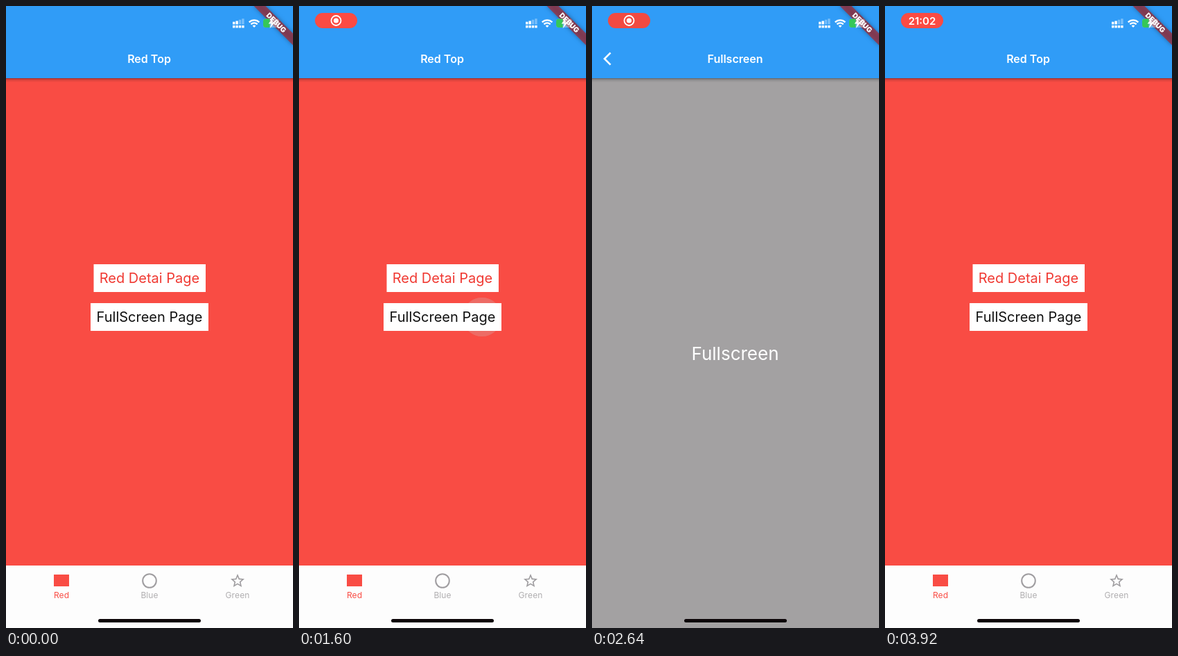
An HTML page for the animation above (4000 ms loop, 414 by 896 pixels).

```html
<!DOCTYPE html>
<html lang="en">
<head>
<meta charset="utf-8">
<title>Tab navigation</title>
<style>
  html, body { margin: 0; width: 100%; height: 100%; overflow: hidden; background: #f94c44; }
  svg { display: block; }
  text { font-family: Inter, Roboto, sans-serif; text-anchor: middle; }
  .title { font-size: 16px; font-weight: 600; fill: #fff; }
  .button { font-size: 20px; }
  .label { font-size: 12px; letter-spacing: .1px; fill: #b0aeb0; }
  .time { font-size: 15px; font-weight: 600; fill: #fff; }
  .debug { font-size: 10.2px; font-weight: 900; fill: #fff; }
  .bar { fill: #309cf7; }
  .banner { filter: drop-shadow(0 0 3px rgba(0, 0, 0, .5)); }

  .home, .scrim, .page, .pill, .pill rect, .rec, .time, .splash {
    animation: 4s linear infinite;
  }
  .home { animation-name: parallax; }
  .scrim { animation-name: dim; }
  .page { animation-name: slide; }
  .pill { animation-name: appear; }
  .pill rect { animation-name: pulse; }
  .rec { animation-name: rec; }
  .time { animation-name: time; }
  .splash { fill: #c8c8c8; transform-box: fill-box; transform-origin: center; }
  .tap { animation-name: tap; }
  .back { animation-name: back; }

  @keyframes slide {
    0% { transform: translateX(434px); }
    41.24% { transform: translateX(434px); }
    41.25% { transform: translateX(414px); animation-timing-function: cubic-bezier(.35, .91, .33, .97); }
    51.65% { transform: none; }
    79.15% { transform: none; animation-timing-function: cubic-bezier(.35, .91, .33, .97); }
    89.55% { transform: translateX(414px); }
    89.56%, 100% { transform: translateX(434px); }
  }
  @keyframes parallax {
    0% { transform: none; }
    41.25% { transform: none; animation-timing-function: cubic-bezier(.35, .91, .33, .97); }
    51.65% { transform: translateX(-138px); }
    79.15% { transform: translateX(-138px); animation-timing-function: cubic-bezier(.35, .91, .33, .97); }
    89.55%, 100% { transform: none; }
  }
  @keyframes dim {
    0% { opacity: 0; }
    41.25% { opacity: 0; animation-timing-function: ease; }
    51.65% { opacity: .094; }
    79.15% { opacity: .094; animation-timing-function: cubic-bezier(.75, 0, .75, .9); }
    89.55%, 100% { opacity: 0; }
  }
  @keyframes appear {
    0%, 1% { opacity: 0; }
    9%, 100% { opacity: 1; }
  }
  @keyframes pulse {
    0% { fill: #fb4b43; animation-timing-function: ease-in-out; }
    17% { fill: #e5483f; animation-timing-function: ease-in-out; }
    38%, 56% { fill: #fb4b43; animation-timing-function: ease-in-out; }
    80%, 86% { fill: #e3473e; animation-timing-function: ease-in-out; }
    97%, 100% { fill: #fb4b43; }
  }
  @keyframes rec {
    0%, 78% { opacity: 1; }
    83.5%, 100% { opacity: 0; }
  }
  @keyframes time {
    0%, 78% { opacity: 0; }
    83.5%, 100% { opacity: 1; }
  }
  @keyframes tap {
    0%, 38% { opacity: 0; transform: scale(.3); }
    40% { opacity: .25; transform: none; }
    43% { opacity: .25; transform: scale(1.6); }
    48%, 100% { opacity: 0; transform: scale(2); }
  }
  @keyframes back {
    0%, 76.5% { opacity: 0; transform: scale(.3); }
    78% { opacity: .38; transform: scale(.7); }
    80% { opacity: .38; transform: none; }
    85%, 100% { opacity: 0; transform: scale(1.06); }
  }
</style>
</head>
<body>
<svg width="414" height="896" viewBox="0 0 414 896">
  <defs>
    <linearGradient id="drop" x2="0" y2="1">
      <stop stop-opacity=".38"/>
      <stop offset=".35" stop-opacity=".14"/>
      <stop offset="1" stop-opacity="0"/>
    </linearGradient>
    <linearGradient id="edge">
      <stop stop-opacity="0"/>
      <stop offset="1" stop-opacity=".016"/>
    </linearGradient>
  </defs>

  <g class="home">
    <rect width="414" height="896" fill="#f94c44"/>
    <rect class="bar" width="414" height="104"/>
    <rect y="104" width="414" height="6" fill="url(#drop)"/>
    <text class="title" x="206.5" y="82">Red Top</text>

    <circle class="splash tap" cx="264" cy="448" r="28"/>
    <rect x="126.5" y="372" width="161.5" height="40" fill="#fff"/>
    <text class="button" x="207" y="399" fill="#f03a33">Red Detai Page</text>
    <rect x="122" y="428" width="170" height="40" fill="#fff"/>
    <text class="button" x="207" y="455" fill="#111">FullScreen Page</text>

    <rect y="806" width="414" height="90" fill="#fdfdfd"/>
    <rect x="69" y="819" width="22" height="17" fill="#f94c44"/>
    <circle cx="207" cy="828" r="9.8" fill="none" stroke="#9f9da0" stroke-width="2"/>
    <path transform="translate(322 816)" fill="#9f9da0" d="M22 9.24l-7.19-.62L12 2 9.19 8.63 2 9.24l5.46 4.73L5.82 21 12 17.27 18.18 21l-1.63-7.03zM12 15.4l-3.76 2.27 1-4.28-3.32-2.88 4.38-.38L12 6.1l1.71 4.04 4.38.38-3.32 2.88 1 4.28z"/>
    <text class="label" x="80" y="852.5" style="fill:#f94c44">Red</text>
    <text class="label" x="207" y="852.5">Blue</text>
    <text class="label" x="334" y="852.5">Green</text>
  </g>

  <rect class="scrim" width="414" height="896"/>

  <g class="page">
    <rect x="-20" width="20" height="896" fill="url(#edge)"/>
    <rect width="414" height="896" fill="#a3a1a2"/>
    <rect class="bar" width="414" height="104"/>
    <rect y="104" width="414" height="6" fill="url(#drop)"/>
    <svg width="414" height="104"><circle class="splash back" cx="28" cy="76" r="33.5"/></svg>
    <path d="M26.7 67.3L18 76l8.7 8.7" fill="none" stroke="#fff" stroke-width="2.6"/>
    <text class="title" x="206.5" y="82">Fullscreen</text>
    <text x="206.5" y="509.5" font-size="26" fill="#fff">Fullscreen</text>
  </g>

  <g class="banner">
    <g transform="translate(390 24) rotate(45)">
      <rect x="-40" y="-6" width="80" height="12" fill="#b71c1c" fill-opacity=".63"/>
      <text class="debug" y="3.7">DEBUG</text>
    </g>
  </g>

  <g fill="#fff">
    <path d="M327 28h3.4v3.4h-3.4zm4.4 0h3.4v3.4h-3.4zm4.4 0h3.4v3.4h-3.4zm4.4 0h3.4v3.4h-3.4zM327 22.8h3.4v3.7h-3.4zm4.4-1.4h3.4v5.1h-3.4z"/>
    <path d="M335.8 19.8h3.4v6.7h-3.4zm4.4-1.6h3.4v8.3h-3.4z" opacity=".35"/>
    <g fill="none" stroke="#fff" stroke-width="2.4">
      <path d="M350.7 23.4a10.3 10.3 0 0 1 14.6 0"/>
      <path d="M353.4 26.3a6.5 6.5 0 0 1 9.2 0"/>
    </g>
    <path d="M355.6 28.6a3.4 3.4 0 0 1 4.8 0L358 31z"/>
    <rect x="371" y="18.5" width="23" height="12.5" rx="3.5" opacity=".35"/>
    <path d="M374.5 18.5h6V31h-6a3.5 3.5 0 0 1-3.5-3.5V22a3.5 3.5 0 0 1 3.5-3.5z" fill="#35c759"/>
    <path d="M385.5 17l-7 8.6h4.3L380.5 32.5l7.2-9h-4.4z"/>
  </g>

  <g class="pill">
    <rect x="23" y="10" width="61" height="22" rx="11"/>
    <g class="rec">
      <circle cx="53.5" cy="21" r="7" fill="none" stroke="#fff" stroke-width="1.8"/>
      <circle cx="53.5" cy="21" r="3.6" fill="#fff"/>
    </g>
    <text class="time" x="53.5" y="26.5">21:02</text>
  </g>

  <rect x="133" y="883" width="148" height="5" rx="2.5" fill="#0c0508"/>
</svg>
</body>
</html>
```
